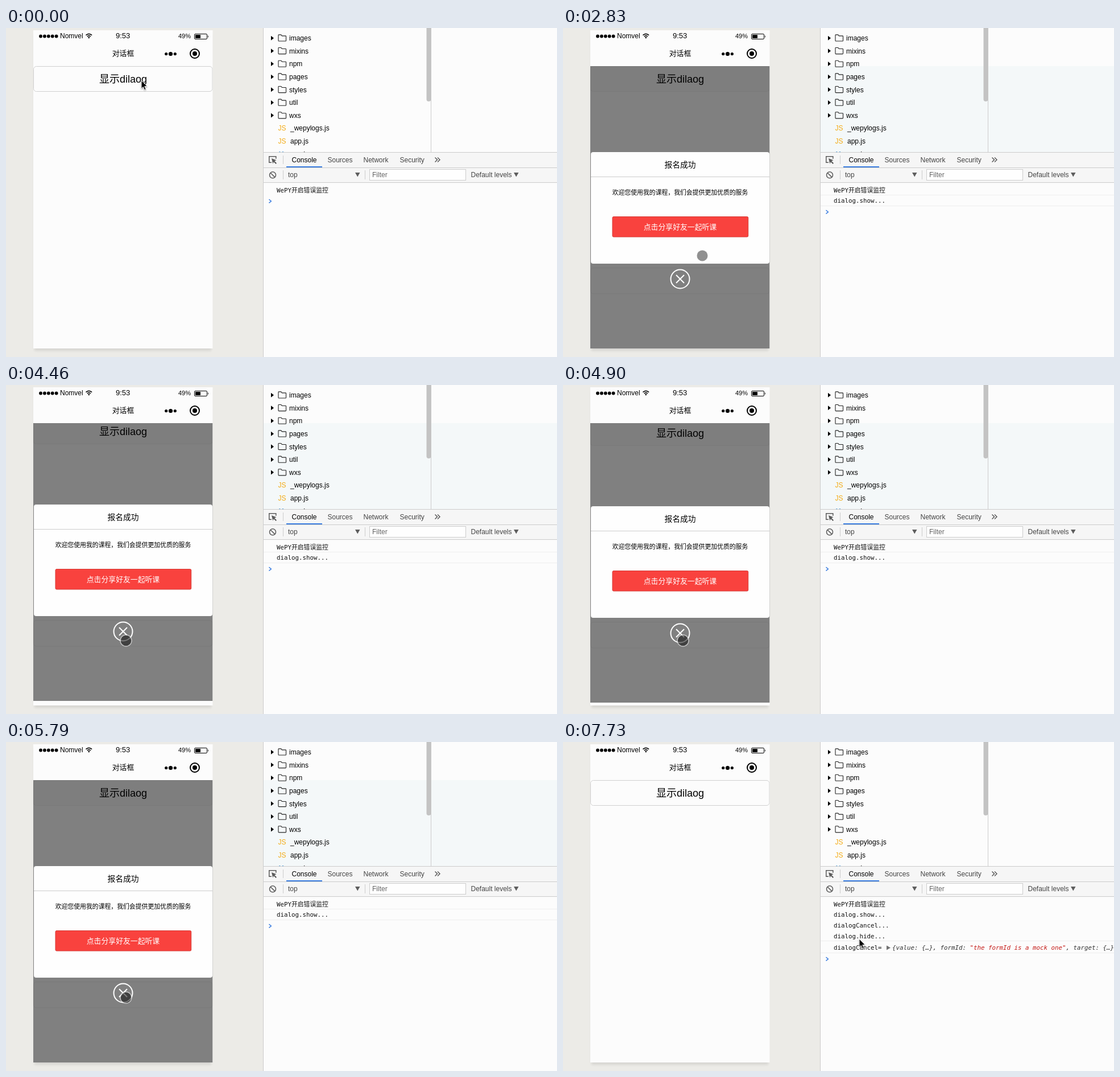
These frames come from a looping animation (969 by 578 pixels, 8 s). An HTML page:

```html
<!DOCTYPE html>
<html lang="zh">
<head>
<meta charset="utf-8">
<title>对话框</title>
<style>
html, body { margin: 0; width: 100%; height: 100%; overflow: hidden; background: #fcfcfc; }
svg { display: block; width: 969px; height: 578px; }
text { font: 12px "Liberation Sans", "Noto Sans CJK SC", "Noto Sans CJK", sans-serif; white-space: pre; fill: #000; }
.mid { text-anchor: middle; }
.tab { fill: #444; }
.mono text { font: 10.8px "DejaVu Sans Mono", "Noto Sans CJK SC", "Noto Sans CJK", monospace; fill: #111; }
.mono .object { font-style: italic; fill: #333; }
.line { fill: none; stroke: #ccc; }
.rule { fill: none; stroke: #eee; }
</style>
</head>
<body>
<svg viewBox="0 0 969 578">
  <defs>
    <clipPath id="pageClip"><rect x="48" y="67" width="315.5" height="496"/></clipPath>
    <clipPath id="treeClip"><rect x="453" width="516" height="218"/></clipPath>
    <filter id="soft" x="-10%" y="-10%" width="120%" height="120%"><feGaussianBlur stdDeviation="2"/></filter>
  </defs>

  <rect width="452" height="578" fill="#ecebe7"/>
  <rect x="50" y="10" width="311" height="557" opacity=".09" filter="url(#soft)"/>
  <rect x="48" y="4" width="315.5" height="559" fill="#fcfcfc"/>

  <g id="status">
    <text x="95" y="18">Nomvel</text>
    <text class="mid" x="205.7" y="18" style="font-size:13px">9:53</text>
    <text x="303" y="18" style="font-size:11px">49%</text>
    <g fill="none" stroke="#000" stroke-width="1.6">
      <path d="M140.5 12.6q5.3-4.6 10.6 0M142.6 15q3.2-2.6 6.4 0"/>
      <rect x="331.5" y="10.5" width="22" height="9" rx="1.5" stroke-width="1"/>
    </g>
    <path d="M143.9 16.4q1.9-1.5 3.8 0l-1.9 2zM333 12h9v6h-9zM355 13q2 2 0 4z"/>
  </g>
  <text class="mid" x="206" y="49.2" style="font-size:12.85px">对话框</text>
  <circle cx="281.7" cy="45.5" r="2.6"/><circle cx="289.5" cy="45.5" r="3.6"/><circle cx="297.3" cy="45.5" r="2.6"/>
  <circle cx="332" cy="45" r="8" fill="none" stroke="#000" stroke-width="2"/><circle cx="332" cy="45" r="4"/>

  <g clip-path="url(#pageClip)">
    <g id="page">
      <rect id="button" x="48.5" y="67.5" width="314.5" height="44" rx="5"/>
      <text id="buttonText" class="mid" x="206" y="96" style="font-size:18px">显示dilaog</text>
      <g id="dialog">
        <rect x="48" y="67" width="315.5" height="496" opacity=".495"/>
        <rect x="48" y="67" width="315.5" height="44" opacity=".02"/>
        <rect x="48.5" y="421.5" width="314.5" height="45.5" rx="5" fill="none" stroke="#000" stroke-opacity=".06"/>
        <rect x="49" y="218" width="314" height="196" rx="4" fill="#fefefe"/>
        <path class="line" d="M49 261.5H363"/>
        <text class="mid" x="206" y="244.5" style="font-size:13.8px">报名成功</text>
        <text class="mid" x="206" y="293.4" style="font-size:10.85px">欢迎您使用我的课程，我们会提供更加优质的服务</text>
        <rect x="87" y="331.5" width="238.7" height="35.5" rx="2" fill="#f9423e" stroke="#d63a36"/>
        <text class="mid" x="206" y="353.8" style="font-size:12.85px;font-weight:500;fill:#fff">点击分享好友一起听课</text>
        <g fill="none" stroke="#fff" stroke-width="2">
          <circle cx="206" cy="441" r="16.5"/>
          <path d="M199 434l14 14m0-14l-14 14"/>
        </g>
      </g>
    </g>
  </g>

  <rect x="453" width="516" height="578" fill="#fcfcfc"/>
  <rect id="tint" x="453" y="67" width="516" height="151" fill="#f4f8f9"/>
  <path class="line" d="M452.5 0V578M747.5 0V218"/>
  <path d="M739.5 0h8v125a4 4 0 0 1-8 0z" fill="#c3c3c3"/>
  <g id="tree" clip-path="url(#treeClip)"></g>

  <rect x="453" y="218" width="516" height="53" fill="#f6f6f6"/>
  <path class="line" d="M453 218.5H969M453 245.5H969M453 271.5H969M487.5 224V239M487.5 250V266M631.5 250V266"/>
  <path d="M493 243h63v2h-63z" fill="#3b7de0"/>
  <g fill="none" stroke="#5a5a5a" stroke-width="1.5">
    <path d="M467 236.2h-4.2v-10.4h12v4"/>
    <circle cx="469" cy="258.3" r="5.5"/><path d="M465.2 254.5l7.6 7.6"/>
    <path d="M754.5 227.5l4 4-4 4m4.5-8l4 4-4 4"/>
  </g>
  <path d="M467 229l8.5 3.2-3.2 1.5 3.7 3.7-1.5 1.5-3.7-3.7-1.5 3.3z" fill="#5a5a5a"/>
  <text x="502.5" y="235.5">Console</text>
  <text class="tab" x="565.5" y="235.5">Sources</text>
  <text class="tab" x="628.5" y="235.5">Network</text>
  <text class="tab" x="692.5" y="235.5">Security</text>
  <text class="tab" x="496" y="262">top</text>
  <rect x="639.5" y="248.5" width="169" height="19" fill="#fefefe" stroke="#ccc"/>
  <text x="644" y="262" style="fill:#666">Filter</text>
  <text class="tab" x="817.5" y="262">Default levels</text>
  <path d="M614 254h8.5l-4.25 7.5zM893 254h8.5l-4.25 7.5z" fill="#5e5e5e"/>

  <g class="mono">
    <text x="476" y="288.6">WePY开启错误监控</text>
    <text id="showLog" x="476" y="307">dialog.show...</text>
    <path id="showRules" class="rule" d="M453 293.5H969M453 312.5H969"/>
    <g id="hideLog">
      <text x="476" y="326">dialogCancel...</text>
      <text x="476" y="345">dialog.hide...</text>
      <text x="476" y="365">dialogCancel=</text>
      <path d="M569 357.5l7 4-7 4z" fill="#727272"/>
      <text class="object" x="579" y="365">{value: {…}, formId: <tspan fill="#c41a16">"the formId is a mock one"</tspan>, target: {…}</text>
      <path class="rule" d="M453 349.5H969M453 370.5H969"/>
    </g>
  </g>
  <path id="prompt" d="M462.5-3l3.8 3.2-3.8 3.2" fill="none" stroke="#3b7de0" stroke-width="1.5"/>

  <g id="cursor">
    <path id="arrow" d="M0 0V14.5l3.3-3 2.3 5.3 2.5-1.1-2.3-5.2h4.6z" stroke="#fff" style="filter:drop-shadow(0 1px 1px #0006)"/>
    <circle id="touch" stroke-opacity=".6" stroke-width="1.5"/>
  </g>
</svg>
<script>
const LOOP = 8000;
const el = id => document.getElementById(id);
const set = (node, attrs) => { for (const k in attrs) node.setAttribute(k, attrs[k]); };
const show = (id, on) => set(el(id), { visibility: on ? 'visible' : 'hidden' });

// Latest row whose start time has passed.
const at = (table, t) => table.reduce((row, next) => next[0] <= t ? next : row);

const CURSOR = [ // start ms, x, y, kind
  [0, 238, 92, 'arrow'],
  [1040, 249, 106, 'hover'], [1190, 241, 101, 'hover'], [1340, 234, 96, 'hover'],
  [1490, 234, 96, 'press'], [1940, 234, 96, 'hover'],
  [2540, 238, 150, 'hover'], [2690, 249, 290, 'hover'], [2830, 245, 400, 'hover'],
  [2980, 233, 428, 'hover'], [3130, 222, 441, 'hover'], [3270, 214, 447, 'hover'],
  [3420, 211, 449, 'hover'], [4020, 211, 449, 'press'],
  [5800, 211, 449, 'hover'], [5940, 216, 445, 'hover'], [6090, 221, 440, 'hover'],
  [6240, 223, 437, 'hover'], [6390, 211, 439, 'hover'],
  [6540, 207, 440, 'press'], [6980, 207, 440, 'hover'],
  [7580, 400, 385, 'arrow'], [7730, 521, 346, 'arrow']
];
const SHIFT = [ // start ms, page offset of the overscroll
  [0, 0], [4020, -3], [4170, -6], [4310, -9], [4460, -8], [4610, -7], [4760, -6],
  [4900, -5], [5050, -4], [5200, -3], [5350, -2], [5500, -1], [5650, 0]
];
const PROMPT = [[0, 304], [1790, 323], [6830, 381]]; // start ms, y

const add = (parent, tag, attrs, text = '') => {
  const node = document.createElementNS('http://www.w3.org/2000/svg', tag);
  set(node, attrs);
  node.textContent = text;
  parent.append(node);
};

for (let i = 0; i < 5; i++) add(el('status'), 'circle', { cx: 61 + i * 6.9, cy: 14.5, r: 2.9 });

const FILES = ['images', 'mixins', 'npm', 'pages', 'styles', 'util', 'wxs', '_wepylogs.js', 'app.js', 'app.json'];
const BADGES = { js: ['JS', '#f3a910'], json: ['{ }', '#3b8fd0'] };

FILES.forEach((name, i) => {
  const y = 17.7 + i * 22.65;
  const tree = el('tree');
  const badge = BADGES[name.split('.')[1]];
  add(tree, 'text', { x: badge ? 500 : 498, y: y + 4.2 }, name);
  if (badge) {
    add(tree, 'text', { x: 478.5, y: y + 4.2, style: `fill:${badge[1]}` }, badge[0]);
  } else {
    add(tree, 'path', { d: `M466 ${y - 4}l5 4-5 4z` });
    add(tree, 'path', {
      d: `M479 ${y + 4.5}v-9.5q0-.8.8-.8h4l1.5 2h6.4q.8 0 .8.8v7.5q0 .8-.8.8h-11.9q-.8 0-.8-.8z`,
      fill: 'none', stroke: '#222', 'stroke-width': 1.1
    });
  }
});

function draw(t) {
  const [, x, y, kind] = at(CURSOR, t);
  const active = t >= 1790 && t < 1940;
  const open = t >= 1940 && t < 6980;
  const shown = t >= 1790;
  const hidden = t >= 6830;
  const press = kind === 'press';

  set(el('page'), { transform: `translate(0 ${at(SHIFT, t)[1]})` });
  set(el('button'), {
    fill: active ? '#dedede' : '#fcfcfc',
    stroke: active ? '#c2c2c2' : open ? '#f0f0f0' : '#d0d0d0'
  });
  el('buttonText').style.fill = active ? '#555' : '#000';
  show('dialog', open);

  show('tint', shown && !hidden);
  show('showLog', shown);
  show('showRules', shown && !hidden);
  show('hideLog', hidden);
  set(el('prompt'), { transform: `translate(0 ${at(PROMPT, t)[1]})` });

  set(el('cursor'), { transform: `translate(${x} ${y})` });
  show('arrow', kind === 'arrow');
  show('touch', kind !== 'arrow');
  set(el('touch'), {
    r: press ? 10 : 9.5,
    'fill-opacity': press ? 0.5 : 0.43,
    stroke: press ? '#fff' : 'none'
  });
}

function tick() {
  draw(performance.now() % LOOP);
  requestAnimationFrame(tick);
}
tick();
</script>
</body>
</html>
```
